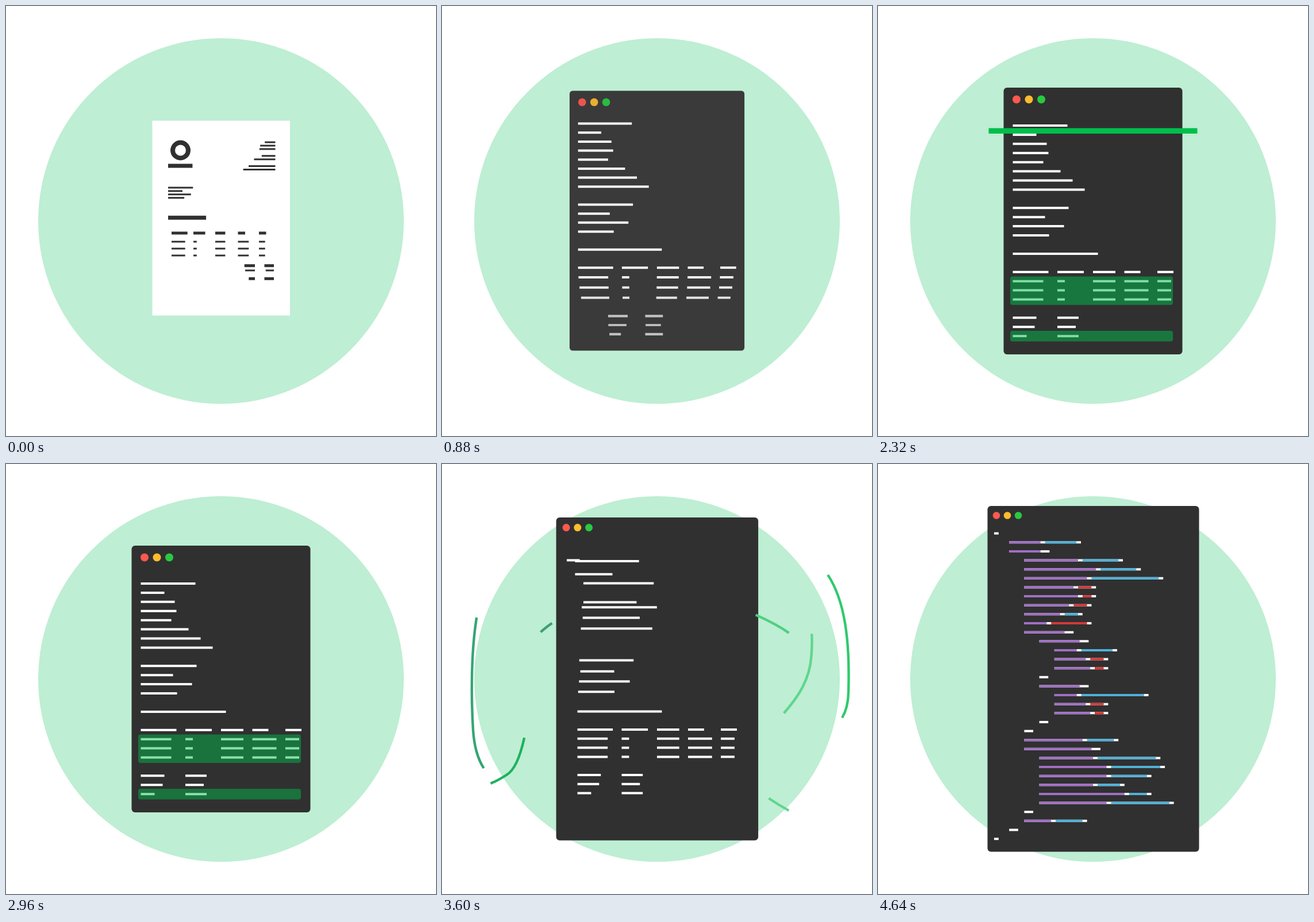
Write an HTML page with a canvas that moves like this. It is 748 px wide and 748 px high and loops after 5520 ms.

```html
<!DOCTYPE html>
<html lang="en">
<head>
<meta charset="utf-8">
<title>Document to code</title>
<style>
  html, body { margin: 0; width: 100%; height: 100%; overflow: hidden; background: #fff; }
  canvas { display: block; width: 748px; height: 748px; }
  svg { position: absolute; width: 0; height: 0; }
</style>
</head>
<body>
<canvas id="stage" width="748" height="748"></canvas>
<svg><path id="ruler"/></svg>
<script>
const ctx = document.getElementById('stage').getContext('2d');
const ruler = document.getElementById('ruler');
const LOOP = 5520, STEP = 80;
const GREEN = [0, 190, 76], WHITE = [255, 255, 255], DARK = [48, 48, 48];
const PURPLE = '#a06fc4', BLUE = '#4fb0d8', RED = '#d3383a';

const clamp = v => Math.max(0, Math.min(1, v));
const span = (t, a, b) => clamp((t - a) / (b - a));
const sine = p => 0.5 - 0.5 * Math.cos(Math.PI * p);
const cubic = p => p < 0.5 ? 4 * p ** 3 : 1 - 4 * (1 - p) ** 3;
const mix = (a, b, k) => a + (b - a) * k;
const mixAll = (a, b, k) => a.map((v, i) => mix(v, b[i], k));
const rgb = c => `rgb(${c.map(Math.round)})`;

function box(x, y, w, h, fill, r = 0) {
  ctx.fillStyle = fill;
  ctx.beginPath();
  ctx.roundRect(x, y, w, h, r);
  ctx.fill();
}
function disc(x, y, r, fill) {
  ctx.fillStyle = fill;
  ctx.beginPath();
  ctx.arc(x, y, r, 0, 2 * Math.PI);
  ctx.fill();
}

// Each code row is this text with its characters drawn as bars
const CHAR = 7.8, INDENT = 26.2;
const code = `{
 invoice:settled,
 details:{
  invoice_code:quarters,
  customer_contact:main-box,
  purchase_order:standard-supply,
  total_price:480,
  total_before:40,
  tax_amount:120,
  currency:eur,
  dated:20310704,
  positions:[
   first_row:{
    title:pencils,
    numbers:120,
    subtotal:12,
   },
   other_row:{
    title:writing-papers,
    numbers:240,
    subtotal:36,
   },
  ],
  delivery_mode:parcel,
  billing_details:{
   company_name:plain-example,
   company_address:green-house,
   company_country:lowlands,
   company_city:south,
   company_postal_area:west,
   company_account:sample-number,
  },
  status:agreed,
 },
}`.split('\n').map((text, i) => {
  const body = text.trim();
  const x = 202 + INDENT * (text.length - body.length);
  const [key, value = ''] = body.includes(':') ? body.split(':') : [''];
  return {
    x, y: 120.7 + 15.63 * i, end: x + CHAR * body.length,
    keyEnd: x + CHAR * key.length, value: /\w/.test(value) && value,
    fade: [4360, 4560]
  };
});

function drawRow({ x, y, end, keyEnd, value }) {
  const bar = (a, b, c) => box(a, y - 2, b - a, 4, c);
  bar(x, end, '#fff');
  bar(x, keyEnd, PURPLE);
  if (value) bar(keyEnd + CHAR, end - CHAR, /^\d/.test(value) ? RED : BLUE);
}

// Text lines go from the page to the terminal, then to a share of a code row
const lines = [], usedRows = new Set();
const RATIO = 2.24;
function line(slot, x, w, doc, row, part = 0, parts = 1) {
  const r = code[row], len = (r.end - r.x) / parts;
  usedRows.add(row);
  if (slot < 8) r.fade = [3720 + row * 32, 3960 + row * 32];
  lines.push({
    slot, row: r,
    doc: [doc[0], doc[1], w / RATIO, doc[2]],
    term: [x, 208 + 15.92 * slot, w, 4],
    goal: [r.x + len * part, r.y, len, 4]
  });
}
const LEFT = 234.5;
const flushRight = (edge, w) => edge - w / RATIO;

const topRows = [1, 0, 2, 3, 6, 8, 3, 6];
[95, 41, 59, 62, 53, 83, 104, 125].forEach((w, i) => line(i, LEFT, w,
  i ? [flushRight(468.5, w), 237 + 5.93 * (i - 1 + (i > 3) + (i > 5)), 3] : [282, 278, 7],
  topRows[i]));
[97, 56, 89, 63].forEach((w, i) =>
  line(9 + i, LEFT, w, [282, 316 + 5.9 * i, 3], 11 + Math.ceil(i / 2 + i % 2 * 0.1) - (i === 3)));
line(14, LEFT, 148, [282, 368.3, 7], 13);

const colX = [LEFT, 312, 374, 428.5, 486], colDoc = [288, 326, 364, 403.5, 440];
[18, 19, 20, 24].forEach((row, i) => {
  const widths = i ? [53, 13, 39, 42, 24] : [62, 46, 39, 28, 28];
  const docY = i ? 398 + 12 * i : 395;
  widths.forEach((w, j) => line(16 + i, colX[j], w, [colDoc[j], docY, i ? 3 : 5], row, j, 5));
});
[[41, 37], [38, 32], [24, 37]].forEach((widths, i) => {
  const docY = 451.7 + 8.3 * i + 6 * (i > 1);
  widths.forEach((w, j) => line(21 + i, colX[j], w,
    [flushRight(433 + 33 * j, w), docY, i === 1 ? 3 : 5], 25 + i, j, 4));
});

// Ribbons fly out, link over to a second arc and come in along a code row
const ribbons = [];
function measure(d) {
  ruler.setAttribute('d', d);
  return ruler.getTotalLength();
}
function ribbon(row, side, tint, out, link = '', back = '', thin = 0) {
  const r = code[row];
  const [from, to] = side < 0 ? [r.x, r.end] : [r.end, r.x];
  const stops = [];
  let d = '';
  for (const piece of [out, link, back, `S${from + side * 10} ${r.y} ${from} ${r.y}`, `H${to}`]) {
    d += piece;
    stops.push(measure(d));
  }
  const [a, b, c, e, f] = stops;
  usedRows.add(row);
  ribbons.push({
    row: r, tint, thin, path: new Path2D(d),
    keys: [[2960, 0, 0], [3280, 0, a], [4000, b, c], [4480, e, f]]
  });
}

ribbon(4, -1, [142, 122, 182], 'M378 572.5H200C110 572 60 555 54 462',
  'C48 360 50 160 126 165', 'C164 167 198 178 236 182', 128);
ribbon(14, 1, [128, 221, 165], 'M416 493H530C650 493 706 468 707 397',
  'C712 240 680 150 577 139', 'C520 141 525 200 478 243');
ribbon(25, 1, WHITE, 'M516 210C560 211 605 232 625 251 645 270 645 300 642.5 334',
  'C638 400 590 435 556 477', 'C535 500 512 511 484 511');
ribbon(23, 1, WHITE, 'M727.5 638H718', 'C650 638 540 580 480 498', 'C462 485 435 480 403 480');
ribbon(7, 1, [208, 240, 220], 'M640 330', 'C620 300 585 280 547 263', 'C500 245 450 234 403 231');
ribbon(10, -1, [79, 154, 130], 'M60 560', 'C80 560 95 552 112 541', 'C150 520 152 390 170 316');
ribbon(9, -1, [160, 111, 196], 'M150 310', 'C165 300 180 282 200 272', 'C218 264 235 261 255 261');

code.forEach((r, row) => {
  if (usedRows.has(row)) return;
  const side = row % 2 ? 1 : -1, bend = row > 20 ? -1 : 1;
  const from = side > 0 ? r.end : r.x;
  ribbon(row, side, [225, 240, 232], `M${from + side * 110} ${r.y + bend * 75}`);
});

function trace(path, tail, head, color, width) {
  if (head - tail < 1) return;
  ctx.strokeStyle = color;
  ctx.lineWidth = width;
  ctx.setLineDash([head - tail, 9999]);
  ctx.lineDashOffset = -tail;
  ctx.stroke(path);
  ctx.setLineDash([]);
}

function drawRibbon({ path, keys, tint, thin, row }, t) {
  if (t < 2960 || t >= row.fade[1]) return;
  const i = t < 3280 ? 0 : t < 4000 ? 1 : 2;
  const [, tail, head] = mixAll(keys[i], keys[i + 1], span(t, keys[i][0], keys[i + 1][0]));
  const k = span(t, 3360, 4000);
  const color = rgb(mixAll(GREEN, tint, k));
  trace(path, tail, Math.min(head, thin), color, 2);
  trace(path, Math.max(tail, thin), head, color, mix(4.6, 4, k));
}

function drawLine({ slot, row, doc, term, goal }, t, p) {
  if (t >= row.fade[1]) return;
  const start = slot < 17 ? 400 + 2.5 * slot : Math.min(516 + 28 * (slot - 17), 628);
  const q = sine(span(t, start, start + 400));
  let s = mixAll(doc, term, q);
  s[1] = mix(doc[1], term[1], 1 - (1 - q) ** 3);
  const zoom = (cx, cy, k) => {
    s = [cx + (s[0] - cx) * k, cy + (s[1] - cy) * k, s[2] * k, s[3]];
  };
  zoom(370, 0, 1 - 0.19 * p * (1 - p) * q ** 8);
  zoom(373, 373, 1 - 0.008 * span(t, 2960, 3280));
  const leave = Math.max(3280, 3140 + 33 * Math.min(slot, 17));
  s = mixAll(s, goal, sine(span(t, leave, leave + 600)));
  box(s[0], s[1] - s[3] / 2, s[2], s[3], rgb(mixAll(DARK, WHITE, q)));
}

function drawPanel(p, g) {
  const page = [254.5, 199.5, 494, 538.5], term = [218.5, 142, 529.5, 606];
  const [x, y, right, bottom] = mixAll(mixAll(page, term, p), [190.5, 73, 558.5, 674.5], g);
  box(x, y, right - x, bottom - y, rgb(mixAll(WHITE, DARK, Math.sqrt(p))), 6 * p);
  ctx.globalAlpha = p;
  const [dx, dy, gap, r] = mixAll([22.5, 20.5, 21.5, 7], [15.5, 16.5, 19, 6.3], g)
    .map(v => v * (0.7 + 0.3 * p));
  ['#ff5850', '#fdbc2e', '#29c940'].forEach((c, i) => disc(x + dx + gap * i, y + dy, r, c));
  ctx.globalAlpha = 1;
}

function drawLogo(alpha) {
  ctx.globalAlpha = alpha;
  ctx.strokeStyle = rgb(DARK);
  ctx.lineWidth = 8;
  ctx.beginPath();
  ctx.arc(303.5, 251, 13.5, 0, 2 * Math.PI);
  ctx.stroke();
  ctx.globalAlpha = 1;
}

function drawScan(t) {
  const glow = (y, h, from) => {
    ctx.globalAlpha = 0.5 * span(t, from, from + 230) * (1 - span(t, 2940, 3200));
    box(230, y, 283, h, rgb(GREEN), 4);
    ctx.globalAlpha = 1;
  };
  glow(470.5, 49.5, 1440);
  glow(565, 18.5, 1600);
  if (t < 960 || t >= 2640) return;
  const k = t < 1700 ? sine(span(t, 960, 1700)) : 1 - sine(span(t, 1700, 2563));
  box(192.5, mix(121, 620.5, k), 363, 9.5, rgb(GREEN));
}

function draw(t) {
  const p = sine(span(t, 400, 1000)), g = cubic(span(t, 3040, 4000));
  ctx.clearRect(0, 0, 748, 748);
  disc(374, 374, 318, '#beeed3');
  drawPanel(p, g);
  if (p < 0.5) drawLogo(1 - 2 * p);
  lines.forEach(l => drawLine(l, t, p));
  drawScan(t);
  ribbons.forEach(r => drawRibbon(r, t));
  code.forEach(r => {
    ctx.globalAlpha = span(t, ...r.fade);
    if (ctx.globalAlpha > 0) drawRow(r);
  });
  ctx.globalAlpha = 1;
}

const origin = performance.now();
function tick() {
  const t = (performance.now() - origin) % LOOP;
  draw(Math.floor(t / STEP) * STEP);
  requestAnimationFrame(tick);
}
tick();
</script>
</body>
</html>
```
